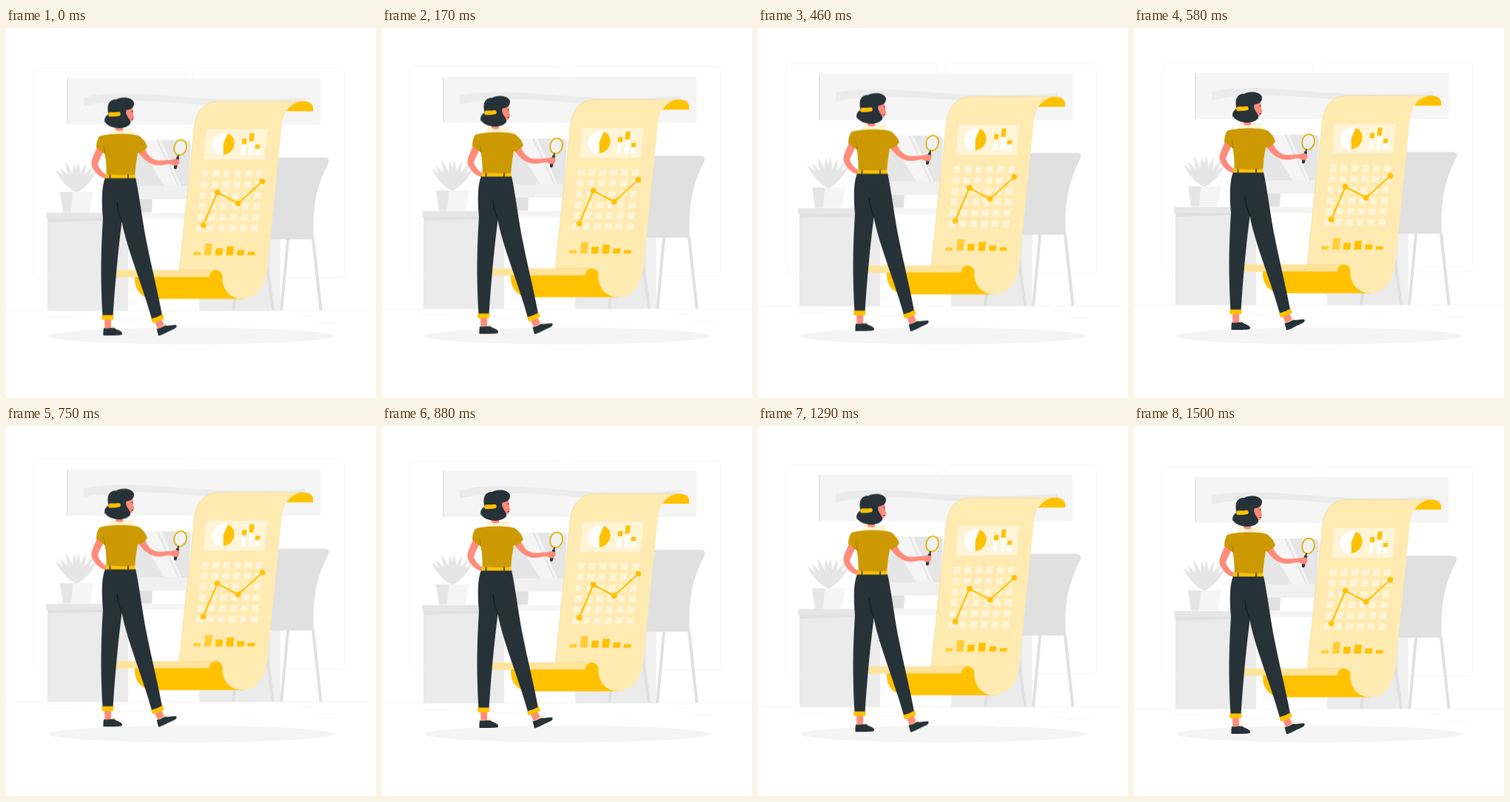
These frames come from a looping animation (500x500 px, 1.54 s). An HTML page without scripts:

```html
<!DOCTYPE html>
<html lang="en">
<head>
<meta charset="utf-8">
<title>Report analysis</title>
<style>
  html, body { margin: 0; width: 100%; height: 100%; overflow: hidden; background: #fff; }
  svg { display: block; width: 100%; height: 100%; }
  .scene { animation: float 1.54s linear -.04s infinite; }
  @keyframes float { 50% { transform: translateY(-10px); } }

  .pale { fill: #f5f5f5; }
  .light { fill: #f0f0f0; }
  .grey { fill: #ebebeb; }
  .mid { fill: #e6e6e6; }
  .dark { fill: #e0e0e0; }
  .gold { fill: #ffc100; }
  .paper { fill: #ffeab1; }
  .cream { fill: #fff4d6; }
  .white { fill: #fff; }
  .ink { fill: #263238; }
  .skin { fill: #ff8b7b; }
  .shirt { fill: #cc9a00; }
  .line { fill: none; stroke-linecap: round; stroke-linejoin: round; }
</style>
</head>
<body>
<svg viewBox="0 0 500 500">
  <defs>
    <path id="leaf" d="M0 0C-5 -13 -4 -28 0 -41C4 -28 5 -13 0 0Z"/>
    <path id="cells" d="M265 0H349" stroke="#fff4d6" stroke-width="9" stroke-dasharray="9 5.7"/>
    <rect id="frame" x="38.3" y="55" width="204.4" height="282.7" rx="5.7" fill="none" stroke="#f5f5f5" stroke-width=".7"/>
  </defs>

  <ellipse class="pale" cx="250" cy="416.2" rx="193.9" ry="11.3"/>

  <g class="scene">
    <!-- Room -->
    <use href="#frame"/>
    <use href="#frame" x="215.1"/>
    <path d="M0 382.5H500M416.8 398.6h33M322.5 401.3h9M396.6 389.3h19M52.5 391h43M104.6 391h6M131.5 395.2h94" stroke="#ebebeb" stroke-width=".4"/>
    <rect class="pale" x="82" y="68.5" width="343" height="62.5"/>
    <rect class="mid" x="82" y="68.5" width="2" height="62.5"/>
    <path class="grey" d="M105 94C150 85 200 91 240 94C300 99 370 98 405 94V100C340 110 290 106 240 102C190 98 150 97 105 105.5Z"/>

    <!-- Desk -->
    <rect class="pale" x="160" y="250" width="210" height="8"/>
    <rect class="grey" x="56" y="258" width="109" height="124.3"/>
    <rect class="grey" x="261" y="258" width="97" height="124.3"/>
    <rect class="light" x="357" y="258" width="13.5" height="124.3"/>
    <path class="mid" d="M54 250H165V258H54Z"/>
    <path class="dark" d="M56 258H165V260L56 263Z"/>

    <!-- Monitor -->
    <path class="dark" d="M176 231H198L197 249.500H176Z"/>
    <path class="mid" d="M150 152H243Q250 153 250 159L246 214H150Z"/>
    <path class="pale" d="M189 152H203L232 214H214L184 166ZM206 152H210L237 214H234Z"/>
    <path class="light" d="M150 214H247L245 232H150Z"/>

    <!-- Plant -->
    <g class="mid" transform="translate(95 223)">
      <use href="#leaf" transform="rotate(-5)"/>
      <use href="#leaf" transform="rotate(4) scale(1 1.02)"/>
      <use href="#leaf" transform="rotate(-19) scale(1 1.08)"/>
      <use href="#leaf" transform="rotate(18) scale(1 1.03)"/>
      <use href="#leaf" transform="rotate(-33)"/>
      <use href="#leaf" transform="rotate(32) scale(1 1.05)"/>
      <use href="#leaf" transform="rotate(-43) scale(1 1.02)"/>
      <use href="#leaf" transform="rotate(43)"/>
    </g>
    <path class="pale" d="M73 222H118L113 249.500H77Z"/>
    <path class="mid" d="M73 222H90L88 249.500H77Z"/>

    <!-- Chair -->
    <path class="line" d="M381 286L372 382.300M415 286L425.500 382.300M352 318L361 382.300M309 364L307 382.300" stroke="#e0e0e0" stroke-width="4" style="stroke-linecap:butt"/>
    <path class="dark" d="M364 175.500H431Q438 176 436 182C424 207 413 232 416 286H352Z"/>

    <!-- Paper scroll -->
    <path fill="#ffe399" d="M148 327.500H285V337.500H148Z"/>
    <path class="gold" d="M174 337H292L320 366.500H200C184 366.500 174 355 174 340Z"/>
    <path class="paper" d="M288 99.500H402C387 100 376 111 373 129L353 326C350 352 337 366.500 318 366.500C303 366 292 354 292 337L284 327.500H234L254.500 134C257 112 269 99.500 288 99.500Z"/>
    <path class="line" d="M402 99.500H288C269 99.500 257 112 254.500 134L234 327.500H284" stroke="#ecd183" stroke-width=".5"/>
    <path class="gold" d="M379 113C384 105 392 99.500 402 99.500C411 99.500 416.500 104 415 113Z"/>
    <path class="gold" d="M274.500 337A9 9.500 0 0 1 292.500 337V340H274.500Z"/>

    <!-- Charts, slanted along the paper -->
    <g transform="matrix(1 0 -.1 1 19.3 0)">
      <rect class="cream" x="265.5" y="137.5" width="82.500" height="40.500"/>
      <circle class="white" cx="290" cy="157.300" r="15"/>
      <path class="gold" d="M290 157.300L294.500 143A15 15 0 0 1 291.500 172.200Z"/>
      <path class="white" d="M315 159h6v13h-6zM325 155h6v17h-6zM334 164h6v8h-6z"/>
      <path class="gold" d="M315 150h6v7h-6zM324.500 142.500h6v11h-6zM333.700 158h6v5.500h-6z"/>
      <use href="#cells" y="197.5"/>
      <use href="#cells" y="212.200"/>
      <use href="#cells" y="226.900"/>
      <use href="#cells" y="241.600"/>
      <use href="#cells" y="256.300"/>
      <use href="#cells" y="271"/>
      <path class="gold" opacity=".7" d="M264.500 303h9.500v4.500h-9.500zM279.200 292h9.500v15.500h-9.500z"/>
      <path class="gold" d="M294 298.300h9.500v9.200h-9.500zM308.700 295.500h9.500v12h-9.500zM323.400 300.500h9.500v7h-9.500zM338 303h9.500v4.500h-9.500z"/>
    </g>
    <path class="line" d="M266.500 267L285.500 222.500L313.500 237.500L346.300 207.700" stroke="#ffc100" stroke-width="2.2"/>
    <path class="line" d="M266.500 267h0M285.500 222.500h0M313.500 237.500h0M346.300 207.700h0" stroke="#ffc100" stroke-width="7.600"/>

    <!-- Magnifier -->
    <g transform="rotate(14 235.500 162)">
      <ellipse cx="235.500" cy="162" rx="8.300" ry="10.500" fill="#fff" fill-opacity=".45" stroke="#e3b100" stroke-width="1.8"/>
      <path class="line" d="M235.500 173V179" stroke="#263238" stroke-width="1.800"/>
      <path class="line" d="M235.500 177V190" stroke="#263238" stroke-width="4"/>
    </g>

    <!-- Arms -->
    <path class="skin" d="M123 162C118 173 114 181 116 187C119 195 126 202 134 204L136 199C130 196 126 190 124 185C125 180 129 173 132 167Z"/>
    <path class="skin" d="M178 167L187 163C192 173 197 179 206 179.500C213 180 219 178.500 224 178.500C228 177 232 177 234 179C235 182 234 186 230 186.500C226 187 224 184 220 184C213 186 205 187 199 185C190 182 183 175 178 167Z"/>

    <!-- Legs -->
    <path class="skin" d="M133 393H142V406H133.500ZM201 398L210 394L214 402L205 407Z"/>
    <path class="ink" d="M132 406C138 407 142 405 146 405.500C150 409 157 409.500 157 413.500C157 416 153 416 131.500 416Q131 411 132 406ZM203.500 407C208 407 212 403 216 402.500C221 403.500 225 401 230 402C232.500 405 227 407.500 221 410C215 413 209 416 206 416.500Z"/>
    <path class="line" d="M144 405L147.500 404.300M213 402L216.500 400" stroke="#ffe399" stroke-width="1.500"/>
    <path class="ink" d="M134 203H175C180 225 184 260 190 290C198 330 207 365 211 389L197 394C185 350 162 295 156.500 262C151 305 147 350 144.500 390H130.500C127 330 129 290 131 258C129 235 129 215 134 203Z"/>
    <path class="line" d="M150 236Q151 250 157 262" stroke="#11181c" stroke-width="1"/>
    <path class="gold" d="M129 388.500H145.500L145 394.500Q137 395.500 129.500 394.500ZM196 393.500Q205 391.500 212 387L213.500 393Q206 398 198 399Z"/>

    <!-- Torso -->
    <path class="cream" d="M142 137L149 134L158 137L172 136L174 146H140Z"/>
    <path class="skin" d="M148 131H158V139Q152 141 148 138Z"/>
    <path class="shirt" d="M126 147C136 143 171 142 181 147Q188 153 191 161Q187 167 180 170L178 169Q175 184 174 200H135.500Q136 184 133.500 171L122 162Q122 153 126 147Z"/>
    <path class="line" d="M132 160L134 170" stroke="#8f6c00" stroke-width=".7"/>
    <path class="gold" d="M135 198Q154 200 174 198.500L174.500 203.500H134Z"/>
    <path class="line" d="M140.500 199V203M165 199V203" stroke="#263238" stroke-width="1.600"/>

    <!-- Head -->
    <path class="skin" d="M161 111L171 107C171.500 113 171.500 117 173.500 121.500L171.500 122.500C172 127 169 128 164 128Z"/>
    <path class="line" d="M170.500 112.500v1.500M169.800 123.800l2 -.4" stroke="#263238" stroke-width="1"/>
    <path class="ink" d="M138.500 117C135.500 104 139 97 149 97C154 93.500 168 93 172.500 100C174.500 106 170 111 162.500 111.500C160 119 169.500 124 168 129.500C165 135 155 137 148 135.500C140 134 132 130 134 123C135 119 138 119 138.500 117Z"/>
    <path class="line" d="M137.500 117.500Q132 122 133.500 128" stroke="#263238" stroke-width=".8"/>
    <path class="gold" d="M140 114.200Q147 114.500 153 113.700Q156 115.500 154 119Q147 120.500 139.500 120.200Q136.500 117.500 140 114.200Z"/>
  </g>
</svg>
</body>
</html>
```
